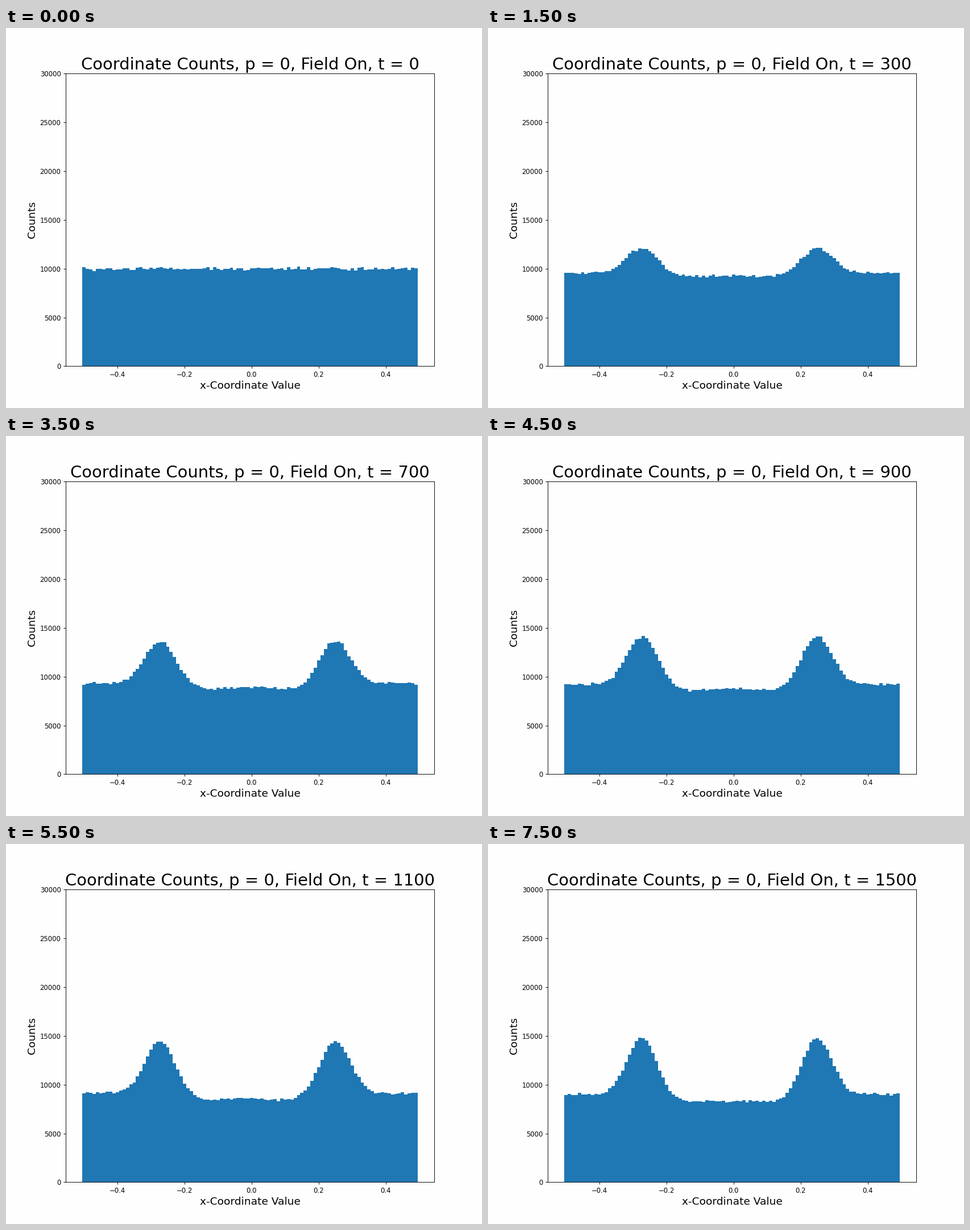
A matplotlib script for the animation above (8 s loop, 837 px wide and 669 px high).

```python
import numpy as np
import matplotlib.pyplot as plt
from matplotlib.animation import FuncAnimation

W, H, DPI = 837, 669, 83.7
FRAMES, INTERVAL, STEP = 16, 500, 100
BINS = 100
PEAKS = (-0.271, 0.247)
START = 10000

plt.rcParams["font.family"] = "DejaVu Sans"
np.random.seed(11)
noise = np.clip(np.random.normal(0, 1, (FRAMES, BINS)), -2.3, 2.3)
x = -0.5 + 0.01 * np.arange(BINS)


def counts(k):
    """Histogram heights after k * STEP time units."""
    width = 0.049 - 0.0003 * k
    inner = START - 445 * np.sqrt(k)
    outer = START - 260 * np.sqrt(k)
    top = START + 5200 * (1 - np.exp(-k / 6))

    # the valley between the peaks drains faster than the outer flanks
    mid = (PEAKS[0] + PEAKS[1]) / 2
    half = (PEAKS[1] - PEAKS[0]) / 2
    inside = 1 / (1 + np.exp((np.abs(x - mid) - half) / 0.02))
    ripple = 110 * np.sin(np.pi * k / FRAMES) * np.cos(24 * (x - mid))
    y = outer + (inner - outer + ripple) * inside

    gain = top - (inner + outer) / 2
    for p in PEAKS:
        y += gain * np.exp(-0.5 * ((x - p) / width) ** 2)
    return y + (100 if k == 0 else 75) * noise[k]


# the small surplus keeps the pixel size from rounding down
fig, ax = plt.subplots(figsize=((W + 0.001) / DPI, (H + 0.001) / DPI),
                       dpi=DPI, facecolor="#fefefe")
ax.set_facecolor("#fefefe")
bars = ax.bar(x, counts(0), width=0.01, color="#1f77b4")
ax.set_xlim(-0.555, 0.545)
ax.set_ylim(0, 30000)
ax.set_xlabel("x-Coordinate Value", fontsize=16)
ax.set_ylabel("Counts", fontsize=16)
title = ax.set_title("", fontsize=25)


def update(k):
    for bar, h in zip(bars, counts(k)):
        bar.set_height(h)
    title.set_text(f"Coordinate Counts, p = 0, Field On, t = {k * STEP}")
    return [*bars, title]


anim = FuncAnimation(fig, update, frames=FRAMES, interval=INTERVAL,
                     repeat=True, repeat_delay=0, blit=False)
plt.show()
```
